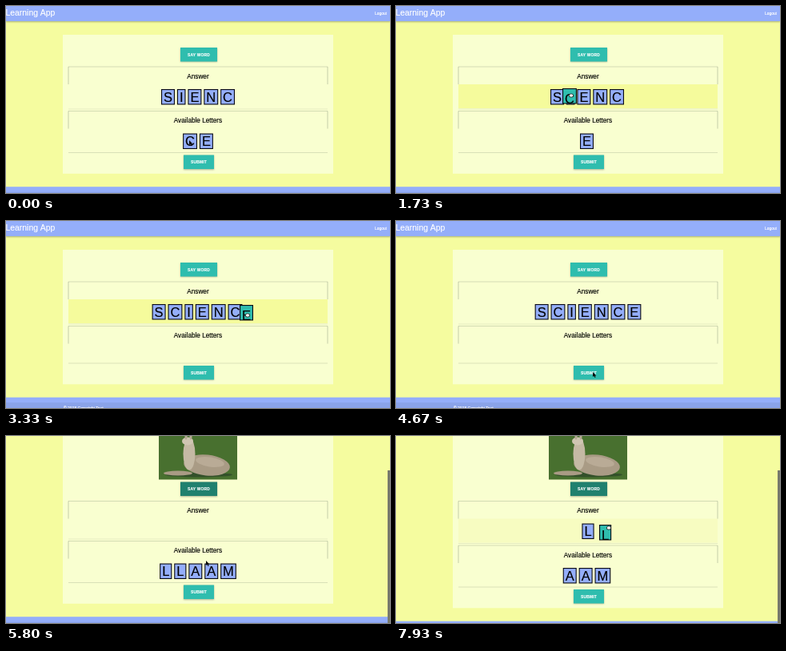
An HTML page with a canvas for the animation above (8 s loop, 480 px wide and 234 px high).

```html
<!DOCTYPE html>
<html lang="en">
<head>
<meta charset="utf-8">
<title>Learning App</title>
<style>
  html, body { margin: 0; width: 100%; height: 100%; overflow: hidden; background: #f5fc9f; }
  canvas { display: block; width: 480px; height: 234px; }
</style>
</head>
<body>
<canvas id="stage" width="480" height="234"></canvas>
<script>
const ctx = document.getElementById('stage').getContext('2d');
const LOOP = 8000, TICK = 200 / 3, NEXT_WORD = 4800, SAY_CLICK = 5270;
const BLUE = '#94aefa', TEAL = '#2fbdae', DARK_TEAL = '#20806e';
const FONT = '"Liberation Sans", Arial, sans-serif';
const TILE_H = 19.5, GAP = 2.9, MAX_SCROLL = 52.5, MAX_TRAVEL = 600;

// Where the pointer comes to rest: arrival time, x, y
const stops = [
  [0, 230, 170], [1400, 219, 112], [2600, 240, 172], [3330, 302, 118],
  [4330, 247, 191], [SAY_CLICK, 240, 119], [5800, 251, 158], [6200, 218, 170],
  [6530, 233, 112], [7330, 213, 169], [7600, 266, 151], [7930, 266, 115]
];
// The dragged tile hangs at (-dx, -dy) from the pointer and lands at index
const drags = [
  { letter: 'C', index: 1, grab: 600, drop: 2000, dx: 11, dy: 9 },
  { letter: 'E', index: 6, grab: 2650, drop: 3530, dx: 10, dy: 13 },
  { letter: 'L', index: 0, grab: 6220, drop: 7030, dx: 7, dy: 10 },
  { letter: 'L', index: 1, grab: 7370, drop: LOOP, dx: 12, dy: 4 }
];

const ramp = (t, a, b) => {
  const k = Math.min(1, Math.max(0, (t - a) / (b - a)));
  return k * k * (3 - 2 * k);
};

function pointerAt(t) {
  let [last, x, y] = stops[0];
  for (const [arrive, nextX, nextY] of stops.slice(1)) {
    const k = ramp(t, Math.max(last, arrive - MAX_TRAVEL), arrive);
    x += (nextX - x) * k;
    y += (nextY - y) * k;
    last = arrive;
  }
  return { x, y };
}

function lettersAt(t) {
  const second = t >= NEXT_WORD;
  let answer = second ? '' : 'SIENC', supply = second ? 'LLAAM' : 'CE';
  for (const { letter, index, grab, drop } of drags) {
    if (second !== grab >= NEXT_WORD) continue;
    if (t >= grab) supply = supply.replace(letter, '');
    if (t >= drop) answer = answer.slice(0, index) + letter + answer.slice(index);
  }
  return { answer, supply };
}

function box(x, y, w, h, color) {
  ctx.fillStyle = color;
  ctx.fillRect(x, y, w, h);
}

function text(str, x, y, size, color = '#000', align = 'center', weight = '') {
  ctx.font = `${weight} ${size}px ${FONT}`;
  ctx.textAlign = align;
  ctx.fillStyle = ctx.strokeStyle = color;
  ctx.lineWidth = .15;
  ctx.fillText(str, x, y);
  ctx.strokeText(str, x, y);
}

function raised(x, y, w, h, color) {
  ctx.save();
  ctx.shadowColor = 'rgba(0,0,0,.3)';
  ctx.shadowBlur = 2;
  ctx.shadowOffsetY = .7;
  box(x, y, w, h, color);
  ctx.restore();
}

function button(label, y, w, color) {
  raised(241 - w / 2, y, w, 17.5, color);
  ctx.letterSpacing = '0.17px';
  text(label, 241, y + 10.5, 4.9, '#fff', 'center', 'bold');
  ctx.letterSpacing = '0px';
}

function tileWidth(letter) {
  ctx.font = `16.5px ${FONT}`;
  return ctx.measureText(letter).width + 6;
}

function tile(letter, x, y, color = BLUE, sag = 0) {
  const w = tileWidth(letter);
  ctx.save();
  box(x, y, w, TILE_H, '#0a0a14');
  box(x + 1.1, y + 1.1, w - 2.2, TILE_H - 2.2, color);
  ctx.beginPath();
  ctx.rect(x, y, w, TILE_H);
  ctx.clip();
  text(letter, x + w / 2, y + 15.5 + sag, 16.5);
  ctx.restore();
}

function row(letters, y, shift) {
  const widths = [...letters].map(tileWidth);
  const total = widths.reduce((a, b) => a + b + GAP, -GAP);
  let x = 240 - total / 2 + shift;
  widths.forEach((w, i) => {
    tile(letters[i], x, y);
    x += w + GAP;
  });
}

const rule = (y, alpha) => box(78, y, 324, 1, `rgba(60,70,60,${alpha})`);

function heading(label, y) {
  rule(y - .5, .2);
  for (const x of [77.5, 401.5]) box(x, y, 1, 22, 'rgba(60,70,60,.27)');
  text(label, 240, y + 14.8, 8.2);
}

function oval(x, y, rx, ry, color, tilt = 0) {
  ctx.fillStyle = color;
  ctx.beginPath();
  ctx.ellipse(x, y, rx, ry, tilt, 0, 7);
  ctx.fill();
}

function llama(y) {
  ctx.save();
  ctx.translate(191, y);
  box(0, 0, 98, 66, '#48702f');
  oval(50, 60, 42, 3, '#33502a');
  oval(60, 48, 29, 13, '#a99b85', .1);
  oval(24, 58, 18, 3, '#a99b85');
  oval(38, 34, 7.5, 20, '#c4b9a4');
  oval(36, 18, 7, 5, '#cfc5b2');
  for (const x of [34, 40]) oval(x, 12, 1.5, 4, '#b5a993');
  oval(64, 44, 18, 6, '#b9ab96', .15);
  ctx.restore();
}

function pointer({ x, y }, holding) {
  if (holding) {
    oval(x, y, 3, 2.5, '#222');
    oval(x, y, 2.3, 1.8, '#fff');
    return;
  }
  ctx.save();
  ctx.translate(x, y);
  ctx.fillStyle = '#080808';
  ctx.fill(new Path2D('M-1-2V4L.5 2.8 1.5 5 2.6 4.5 1.7 2.4H3.4Z'));
  ctx.restore();
}

function draw(t) {
  const second = t >= NEXT_WORD;
  const scroll = MAX_SCROLL * ramp(t, 5400, 5800);
  const { answer, supply } = lettersAt(t);
  const drag = drags.find(d => t >= d.grab && t < d.drop);
  const mouse = pointerAt(t);
  const hover = drag && !second && mouse.y - drag.dy < 125;

  const answerY = second ? 134 - scroll : 76;
  const supplyY = answerY + (answer ? 55.5 : 50);
  const endY = supplyY - (supply ? 0 : 5.5);
  const footerY = endY + 94.7;

  box(0, 0, 480, 234, '#f5fc9f');
  raised(0, -scroll, 480, 19, BLUE);
  text('Learning App', -.5, 12.3 - scroll, 10.4, '#fff', 'left');
  text('Logout', 461, 10.5 - scroll, 4.9, '#fff', 'left');

  box(71, 36 - scroll, 338, endY + 42.3 + scroll, '#f9ffd0');
  if (second) llama(41 - scroll);
  button('SAY WORD', answerY - 24, 46, t >= SAY_CLICK ? DARK_TEAL : TEAL);

  if (hover || (drag && second))
    box(78, answerY + 22, 324, supplyY - answerY - 25.5, hover ? '#f5fb9c' : '#f7fcc1');
  heading('Answer', answerY);
  row(answer, answerY + 28, hover ? -1 : 0);
  rule(supplyY - 3, .1);
  heading('Available Letters', supplyY);
  row(supply, supplyY + 28, drag ? -1.5 : 0);
  rule(endY + 51.5, .17);
  button('SUBMIT', endY + 55, 38, TEAL);

  box(0, footerY, 480, 80, BLUE);
  box(0, footerY + 6.5, 480, 80, '#8aa3e9');
  text('© 2018 Copyright Text', 72, footerY + 15.5, 5, '#fff', 'left');

  if (scroll) box(477, 43 * scroll / MAX_SCROLL, 3, 191, '#77796c');
  if (drag) tile(drag.letter, mouse.x - drag.dx, mouse.y - drag.dy, TEAL, 3);
  pointer(mouse, drag);
}

function frame(now) {
  draw(Math.floor((now % LOOP + 5) / TICK) * TICK % LOOP);
  requestAnimationFrame(frame);
}
requestAnimationFrame(frame);
</script>
</body>
</html>
```
